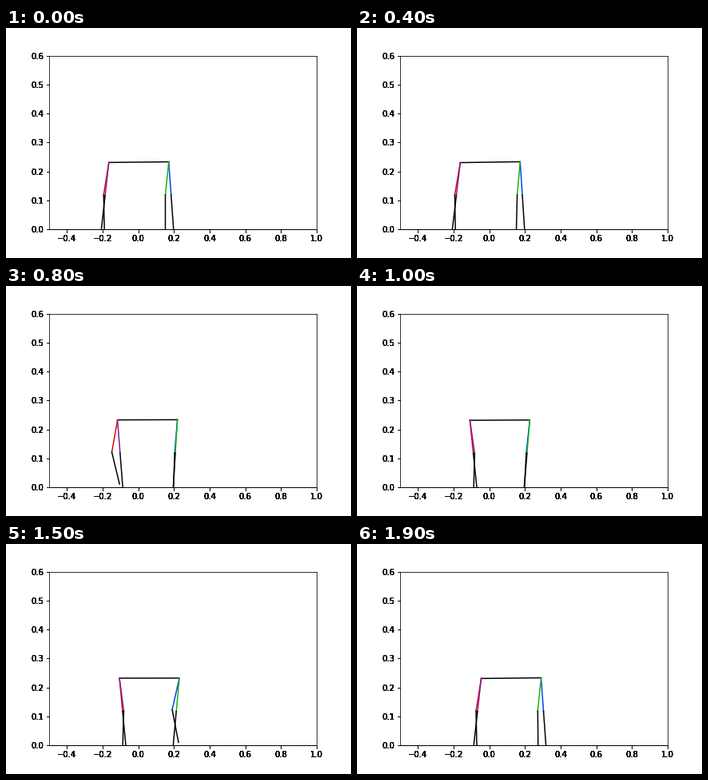
A matplotlib script that plays this animation: 432 px wide and 288 px high, repeating every 2 s.

```python
import numpy as np
import matplotlib.pyplot as plt
from matplotlib.animation import FuncAnimation

FRAMES = 20
THIGH, SHIN = 0.116, 0.1185
REACH = THIGH + SHIN
BODY = 0.336
LIFT = 0.012

# The body drifts slowly and surges twice: (start, end, distance)
START, DRIFT = -0.165, 0.0006
SURGES = [(4, 8.6, 0.0505), (15.2, 19, 0.058)]

# Each leg: first foothold, then its steps as (start, end, distance)
REAR = {"red": (-0.190, [(6.2, 9, 0.12)]),
        "purple": (-0.207, [(4, 6.2, 0.12)])}
FRONT = {"blue": (0.198, [(14, 17.2, 0.12)]),
         "green": (0.152, [(4, 6, 0.044), (17, 19, 0.078)])}


def ramp(t, start, end):
    return np.clip((t - start) / (end - start), 0, 1)


def body_x(t):
    return START + DRIFT * t + sum(d * ramp(t, a, b) for a, b, d in SURGES)


def foot_at(leg, t):
    """Foot position, and whether the foot is in the air."""
    x, steps = leg
    y = 0
    for start, end, dist in steps:
        s = ramp(t, start, end)
        x += dist * s * s * (3 - 2 * s)
        y += LIFT * np.sin(np.pi * s)
    return np.array([x, y]), y > 1e-6


def hip_at(x, feet):
    """The hip rides as high as its most stretched leg allows."""
    tops = [fy + np.sqrt(REACH**2 - (fx - x)**2) for (fx, fy), _ in feet]
    return np.array([x, min(tops)])


def knee_at(hip, foot, swinging):
    """Knee bends back while swinging, towards the foot while standing."""
    leg = foot - hip
    dist = min(np.hypot(*leg), REACH)
    along = (THIGH**2 - SHIN**2 + dist**2) / (2 * dist)
    bend = np.sqrt(max(THIGH**2 - along**2, 0))
    side = -1 if swinging else np.sign(leg[0])
    unit = leg / dist
    return hip + along * unit + side * bend * np.array([-unit[1], unit[0]])


def join(line, a, b):
    line.set_data([a[0], b[0]], [a[1], b[1]])


fig = plt.figure(figsize=(6, 4), dpi=72, facecolor="white")


def add_axes(label):
    ax = fig.add_axes([0.125, 0.125, 0.775, 0.755], label=label)
    ax.set(xlim=(-0.5, 1), ylim=(0, 0.6))
    ax.patch.set_visible(False)
    return ax


# Stacked axes darken the soft edges of the tick labels.
for layer in range(7):
    under = add_axes(f"under{layer}")
    under.spines[["left", "top", "right"]].set_visible(False)
ax = add_axes("walk")


def add_line(color):
    return ax.plot([], [], color=color, lw=1.5)[0]


body = add_line("black")
legs = {**FRONT, **REAR}
thighs = {name: add_line(f"xkcd:{name}") for name in legs}
shins = {name: add_line("black") for name in legs}


def update(t):
    x = body_x(t)
    hips = []
    for group, hip_x in ((REAR, x), (FRONT, x + BODY)):
        feet = {name: foot_at(leg, t) for name, leg in group.items()}
        hip = hip_at(hip_x, feet.values())
        hips.append(hip)
        for name, (foot, swinging) in feet.items():
            knee = knee_at(hip, foot, swinging)
            join(thighs[name], hip, knee)
            join(shins[name], knee, foot)
    join(body, *hips)
    return [body, *thighs.values(), *shins.values()]


anim = FuncAnimation(fig, update, frames=FRAMES, interval=100,
                     init_func=lambda: update(0), repeat=True)
plt.show()
```
